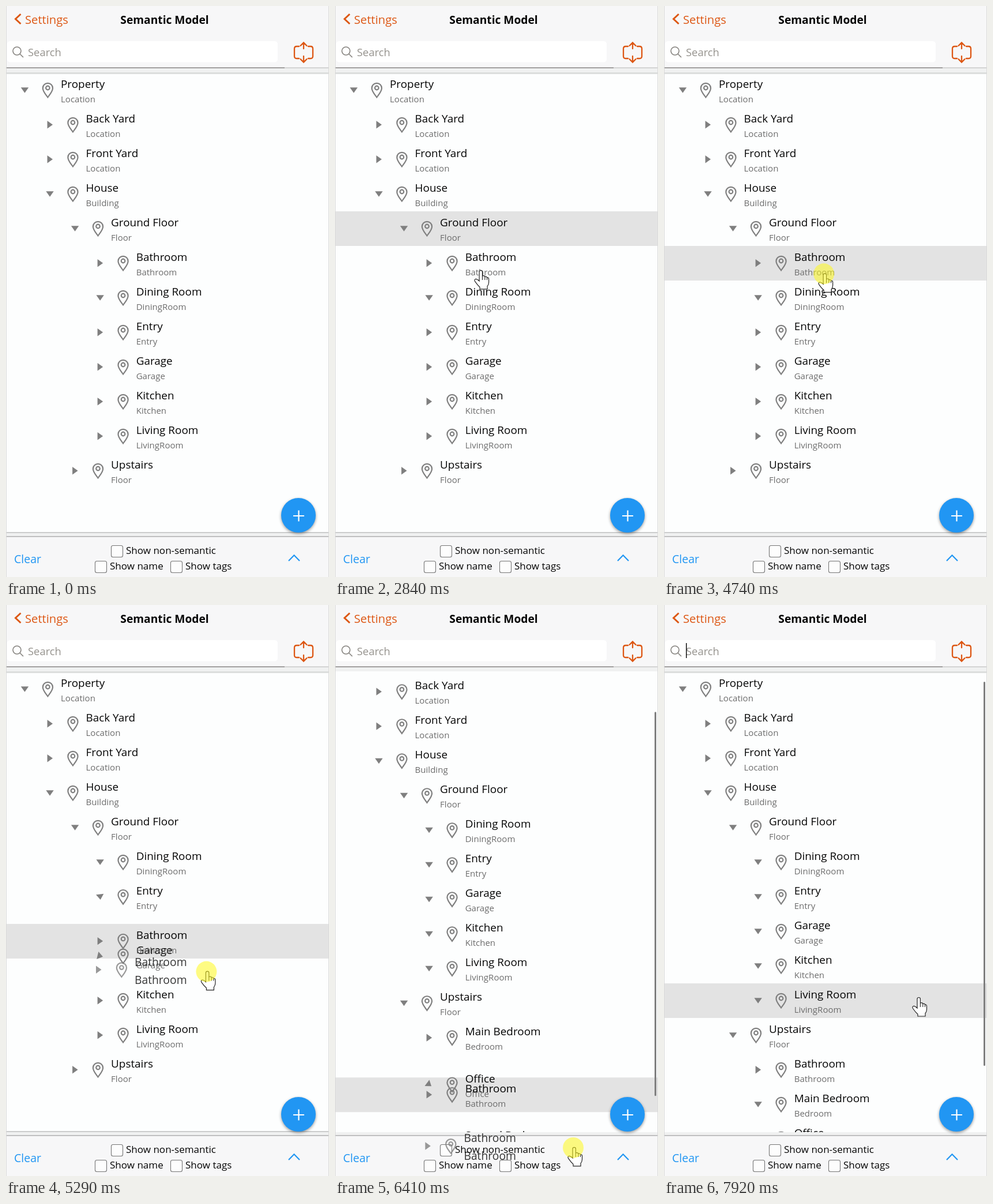
Write an HTML page with a canvas that moves like this. It is 560 by 990 pixels and loops after 8000 ms.

```html
<!DOCTYPE html>
<html lang="en">
<head>
<meta charset="utf-8">
<title>Semantic Model</title>
<style>
html, body { margin: 0; width: 100%; height: 100%; overflow: hidden; background: #fdfefe; }
canvas { display: block; width: 560px; height: 990px; }
</style>
</head>
<body>
<canvas id="stage" width="560" height="990"></canvas>
<script>
const ctx = document.getElementById('stage').getContext('2d');
const LOOP = 8000, ROW = 60, TOP = 116, SLIDE = 200;
const FONT = '"Open Sans", "Noto Sans", sans-serif';
const BLUE = '#2196f3', ORANGE = '#dd5714', GRAY = '#7f7f7f', BAR = '#f7f7f8', PAPER = '#fdfefe';

// main moments
const ENTER = 1050, HOVER = 1880, PRESS = 4150, DRAG = 4740, EXPAND = 6120;
const SCROLL = 6260, LIFT = 6400, DROP = 6900, RETURN = 7640;
const UPSTAIRS = 10, FIRST_SLOT = 5, HOVER_LAG = 120;

// the dragged row passes one room after another, then enters the upper floor
const pass = i => 4950 + 155 * i;
const swaps = [];
for (let i = 0; i < 5; i++) swaps.push({ time: pass(i), slot: FIRST_SLOT + 1 + i });
swaps.push({ time: EXPAND + 70, slot: 12 }, { time: 6330, slot: 13 },
  { time: 6500, slot: 12 }, { time: 6660, slot: 11 });

const OPEN = -SLIDE, SHUT = Infinity;
const item = (level, title, sub, opens) => ({ level, title, sub, opens });
const bath = item(3, 'Bathroom', 'Bathroom', SHUT);
const rows = [
  item(0, 'Property', 'Location', OPEN),
  item(1, 'Back Yard', 'Location', SHUT),
  item(1, 'Front Yard', 'Location', SHUT),
  item(1, 'House', 'Building', OPEN),
  item(2, 'Ground Floor', 'Floor', OPEN),
  item(3, 'Dining Room', 'DiningRoom', OPEN),
  item(3, 'Entry', 'Entry', pass(1)),
  item(3, 'Garage', 'Garage', pass(2)),
  item(3, 'Kitchen', 'Kitchen', pass(3)),
  item(3, 'Living Room', 'LivingRoom', pass(4)),
  item(2, 'Upstairs', 'Floor', EXPAND),
  item(3, 'Main Bedroom', 'Bedroom', 6660),
  item(3, 'Office', 'Office', 6330),
  item(3, 'Second Bedroom', 'Bedroom', SHUT)
];

// pointer moves: start, end, x, y
const MOVES = [
  [ENTER, 1680, 235, 768], [HOVER, 2250, 250, 619],
  [2490, 2700, 250, 400], [2700, 2840, 251, 459], [2840, 3120, 279, 445],
  [3340, 3750, 271, 438], [DRAG - 60, DRAG, 277, 464], [DRAG, 5710, 401, 766],
  [5910, 6330, 413, 949], [LIFT, 6760, 413, 685], [RETURN, 7920, 440, 681]
];

const clamp = v => Math.max(0, Math.min(1, v));
const span = (t, a, b) => clamp((t - a) / (b - a));
const mix = (a, b, f) => a + (b - a) * f;
const easeOut = f => 1 - (1 - f) ** 2;

function pointerAt(t) {
  let x = 525, y = 985;
  for (const [a, b, nx, ny] of MOVES) {
    const f = span(t, a, b);
    x = mix(x, nx, f);
    y = mix(y, ny, f);
  }
  return { x, y };
}

const scrollAt = t => 103 * (span(t, SCROLL, SCROLL + 280) - easeOut(span(t, RETURN - 40, 7900)));

// slides smoothly whenever the dragged row changes its slot
function slide(t, target) {
  let pos = target(FIRST_SLOT);
  for (const { time, slot } of swaps) pos = mix(pos, target(slot), easeOut(span(t, time, time + SLIDE)));
  return pos;
}

function rect(x, y, w, h, color) {
  ctx.fillStyle = color;
  ctx.fillRect(x, y, w, h);
}

function box(x, y, w, h, r, color) {
  ctx.beginPath();
  ctx.roundRect(x, y, w, h, r);
  ctx.fillStyle = color;
  ctx.fill();
}

function text(str, x, y, size, color, weight = 400) {
  ctx.font = `${weight} ${size}px ${FONT}`;
  ctx.fillStyle = color;
  ctx.fillText(str, x, y);
}

function line(d, color, width) {
  ctx.strokeStyle = color;
  ctx.lineWidth = width;
  ctx.stroke(new Path2D(d));
}

function disc(x, y, r, color) {
  ctx.beginPath();
  ctx.arc(x, y, r, 0, Math.PI * 2);
  ctx.fillStyle = color;
  ctx.fill();
}

function at(x, y, draw) {
  ctx.save();
  ctx.translate(x, y);
  draw();
  ctx.restore();
}

const PIN = 'M0 12.3C-3 8 -8.6 2 -8.6 -3.6A8.6 8.6 0 0 1 8.6 -3.6C8.6 2 3 8 0 12.3Z' +
  'M-3.3 -4a3.3 3.3 0 1 0 6.6 0a3.3 3.3 0 1 0 -6.6 0';
const HAND = new Path2D('M-1 18V2Q-1 -.5 1.7 -.5Q4.4 -.5 4.4 2V9Q8.5 8 8.8 10.5Q12 9.5 12.5 12' +
  'Q15.5 11.5 15.5 14.5V20Q15.5 24 13 27V32H0V28.5Q-4 25 -8.5 18.5Q-10 15.5 -7.5 14.5Q-5 14 -1 18Z');

function icons(x, y, turn) {
  at(x - 62.5, y - 0.3, () => {
    ctx.rotate(turn * Math.PI / 2);
    ctx.fillStyle = GRAY;
    ctx.fill(new Path2D('M-4.5 -6.7L5 0L-4.5 6.7Z'));
  });
  at(x - 22.6, y, () => line(PIN, GRAY, 2.2));
}

function drawRow({ level, title, sub, opens }, y, t) {
  const x = 95 + level * 43.55;
  icons(x, y + 30, clamp((t - opens) / SLIDE));
  text(title, x, y + 26, 18.9, '#050505');
  text(sub, x, y + 51, 15.05, '#6c6c6c');
}

function hoveredRow(t, placed) {
  if (t < HOVER) return null;
  if (t >= DRAG && t < DROP) return bath;
  const { y } = pointerAt(t - HOVER_LAG);
  return placed.find(p => y >= p.y && y < p.y + ROW)?.row;
}

function drawList(t) {
  const scroll = scrollAt(t), opened = t >= EXPAND;
  const place = (row, target) => ({ row, y: TOP + slide(t, target) * ROW - scroll });
  const placed = rows.slice(0, opened ? rows.length : UPSTAIRS + 1)
    .map((row, i) => place(row, slot => i < slot ? i : i + 1));
  placed.push(place(bath, slot => slot));
  const hovered = hoveredRow(t, placed);

  ctx.save();
  ctx.beginPath();
  ctx.rect(0, 115, 560, 799);
  ctx.clip();
  rect(0, 115 - scroll, 560, 3, '#dcdedd');
  for (const { row, y } of placed) if (row === hovered) rect(0, y, 560, ROW, '#e3e3e3');
  for (const { row, y } of placed) drawRow(row, y, t);
  rect(0, opened ? 1015 - scroll : 912, 560, 2, '#cbcccc');
  ctx.restore();

  if (t >= SCROLL) box(554, 133 + scroll * 0.942, 3, 666, 1.5, '#808080');
}

function drawHeader(t) {
  rect(0, 0, 560, 107, BAR);
  line('M25.5 14L16.5 22.5L25.5 31', ORANGE, 3);
  text('Settings', 33, 31, 20.2, ORANGE);
  ctx.textAlign = 'center';
  text('Semantic Model', 275, 31, 19.2, '#050505', 700);
  ctx.textAlign = 'left';

  box(2, 61, 469, 36.5, 5, '#fff');
  line('M12 78a7 7 0 1 0 14 0a7 7 0 1 0 -14 0M24 83L30 89', '#85827e', 1.6);
  text('Search', 38, 87, 18.4, '#96938e');
  if (t >= RETURN) rect(38, 66, 1.5, 26, '#111');

  ctx.lineCap = 'round';
  line('M508 70H504Q500 70 500 74V87Q500 91 504 91H508M524 70H528Q532 70 532 74V87Q532 91 528 91H524' +
    'M516 64V74M510.5 69L516 63.5L521.5 69M516 87V97M510.5 92L516 97.5L521.5 92', ORANGE, 2.3);
  ctx.lineCap = 'butt';

  rect(0, 107, 560, 8, '#f0f1f1');
  rect(0, 106.5, 560, 1.5, '#c9c9c9');
  rect(0, 106.5, 483, 1.5, '#8e8b8b');
}

function check(label, x, y) {
  box(x + 0.5, y + 0.5, 20, 20, 3, '#fdfdfd');
  ctx.strokeStyle = '#767676';
  ctx.lineWidth = 1.1;
  ctx.stroke();
  text(label, x + 26, y + 15, 17.05, '#050505');
}

function drawFooter() {
  rect(0, 914, 560, 6, '#f0f1f1');
  rect(0, 920, 560, 70, BAR);
  rect(0, 919, 560, 1.6, '#b4b4b4');
  text('Clear', 14, 966, 19.5, BLUE);
  check('Show non-semantic', 182, 935);
  check('Show name', 154, 962);
  check('Show tags', 285, 962);
  line('M490 962L499.5 952.3L509 962', BLUE, 2.2);

  ctx.save();
  ctx.shadowColor = 'rgba(0,0,0,.4)';
  ctx.shadowBlur = 5;
  ctx.shadowOffsetY = 2;
  disc(507, 883, 30, BLUE);
  ctx.restore();
  line('M498 884H517M507.5 874.5V893.5', '#fff', 2.2);
}

// the translucent copy that follows the pointer
function drawGhost(t, pointerY) {
  const f = span(t, LIFT, 6760);
  const x = mix(223, 236, f), y = pointerY + mix(-3, 8.5, f);
  ctx.save();
  ctx.globalAlpha = 0.8;
  icons(x, y, 0);
  text(bath.title, x, y - 7, 19.3, '#050505');
  text(bath.sub, x, y + 24, 19.3, '#050505');
  ctx.restore();
}

function drawPointer(t, { x, y }) {
  at(x, y, () => {
    ctx.fillStyle = '#fff';
    ctx.fill(HAND);
    ctx.strokeStyle = '#222';
    ctx.lineWidth = 1.2;
    ctx.stroke(HAND);
    line('M4.4 9V16M8.8 10.5V16M12.5 12V16', '#222', 1.1);
  });
  if (t >= PRESS && t < DROP) disc(x, y, 18, 'rgba(255,250,30,.55)');
}

function render(t) {
  const pointer = pointerAt(t);
  rect(0, 0, 560, 990, PAPER);
  drawList(t);
  drawHeader(t);
  drawFooter();
  rect(0, 0, 1, 990, '#dadada');
  rect(559, 0, 1, 990, '#dadada');
  if (t > DRAG + 60 && t < DROP) drawGhost(t, pointer.y);
  if (t >= ENTER) drawPointer(t, pointer);
}

const start = performance.now();
function frame() {
  render((performance.now() - start) % LOOP);
  requestAnimationFrame(frame);
}
frame();
</script>
</body>
</html>
```
